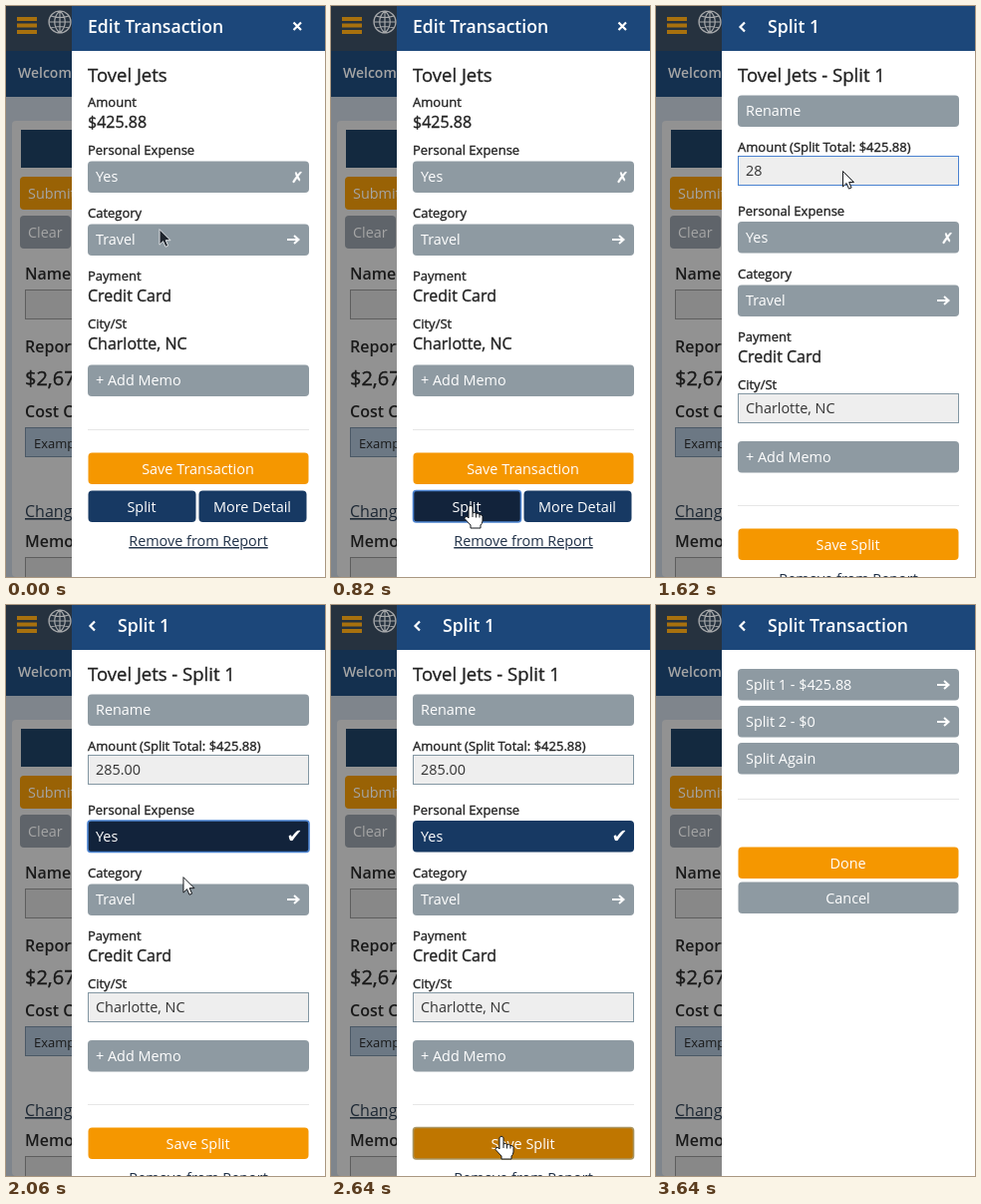
Recreate the animation shown at these times as an HTML page. Size 320 px wide and 572 px high, loop 8640 ms.

```html
<!DOCTYPE html>
<html lang="en">
<head>
<meta charset="utf-8">
<title>Split a transaction</title>
<style>
html, body { margin: 0; width: 100%; height: 100%; overflow: hidden; background: #fff; }
svg { display: block; width: 100vw; height: 100vh; }
text { font-family: "Open Sans", sans-serif; white-space: pre; }
.sym { font-family: "DejaVu Sans", sans-serif; }
.medium { stroke: currentColor; stroke-width: .35px; }
</style>
</head>
<body>
<svg viewBox="0 0 320 572">
  <g id="back"></g>
  <g id="panel"></g>
  <g id="cursor"></g>
</svg>
<script>
const LOOP = 8640;
const GREY = '#8e9aa2', GREY_ON = '#6c7781', NAVY = '#173963', NAVY_ON = '#12233b',
      ORANGE = '#f59700', ORANGE_ON = '#bf7600', INK = '#222', RING = '#4a82d0';
const VENDOR = 'Tovel Jets';
const $ = id => document.getElementById(id);

const text = (x, y, s, size = 14.4, fill = INK, more = '') =>
  `<text x="${x}" y="${y}" font-size="${size}" fill="${fill}" color="${fill}" ${more}>${s}</text>`;
const rect = (x, y, w, h, fill, more = '') =>
  `<rect x="${x}" y="${y}" width="${w}" height="${h}" fill="${fill}" ${more}/>`;
const line = (d, color, width) =>
  `<path d="${d}" fill="none" stroke="${color}" stroke-width="${width}"/>`;

const medium = 'class="medium"', semi = 'font-weight="600"', mid = 'text-anchor="middle"';
const label = (y, s) => text(82, y, s, 13, INK, medium);
const value = (y, s) => text(82, y, s, 16, INK, medium);
const heading = s => text(82, 76, s, 18.5, INK, medium);
const rule = y => rect(82, y, 222, 1, '#e6e6e6');
const arrow = y => line(`M282 ${y}h11.5m-4.5 -4l4.5 4l-4.5 4`, '#fff', 2);

function box(x, y, w, h, fill, focus) {
  return rect(x, y, w, h, fill, 'rx="4"') +
    (focus ? rect(x, y, w, h, 'none', `rx="3" stroke="${focus}" stroke-width="1.6"`) : '');
}
const row = (y, s, fill = GREY, focus) =>
  box(82, y, 222, 31.5, fill, focus) + text(90, y + 20.5, s, 14.4, '#fff');
const action = (y, s, fill = ORANGE, focus, x = 82, w = 222) =>
  box(x + .5, y + .5, w - 1, 31.5, fill, focus) +
  text(x + w / 2 - .5, y + 22, s, 14.4, '#fff', mid);
const field = (y, s, focus) =>
  rect(82.5, y + .5, 221, 29, '#eee', `stroke="${focus ? RING : '#8397a3'}"`) +
  text(90, y + 20, s, 14.4, '#333');

function toggle(y, on, focus) {
  const fill = on ? (focus ? NAVY_ON : NAVY) : (focus ? GREY_ON : GREY);
  const mark = on ? text(281.5, y + 22, '✔', 19, '#fff', 'class="sym"')
                  : text(286, y + 21.5, '✗', 15, '#fff', 'class="sym medium"');
  return row(y, 'Yes', fill, focus && RING) + mark;
}

function header(s, closable) {
  return rect(66, 0, 254, 572, '#fff') + rect(66, 0, 254, 45, '#1c477a') +
    text(closable ? 82 : 112, 27, s, 17.6, '#fff', semi) +
    line(closable ? 'M288.5 16.5l7.5 7.5m0 -7.5l-7.5 7.5' : 'M89 16.5l-4.5 4.5l4.5 4.5', '#fff', 2.2);
}

function editPage(t) {
  return header('Edit Transaction', true) + heading(VENDOR) +
    label(101, 'Amount') + value(122, '$425.88') +
    label(149, 'Personal Expense') + toggle(155.5, t > 200 && t < 360, t > 200 && t < 780) +
    label(212, 'Category') + row(218.5, 'Travel') + arrow(234) +
    label(275, 'Payment') + value(296, 'Credit Card') +
    label(323, 'City/St') + value(344, 'Charlotte, NC') +
    row(359.5, '+ Add Memo') + rule(424) +
    action(447, 'Save Transaction') +
    action(485, 'Split', t > 780 ? NAVY_ON : NAVY, t > 780 && RING, 82, 109) +
    action(485, 'More Detail', NAVY, '', 193, 109) +
    text(193, 541, 'Remove from Report', 14.4, '#1f3047', mid + ' text-decoration="underline"');
}

function splitsPage(t) {
  const focus = t > 1160 && t < 1300;
  return header('Split Transaction') +
    row(64, 'Split 1 - $425.88', focus ? GREY_ON : GREY, focus && RING) + arrow(80) +
    row(101, 'Split 2 - $0') + arrow(117) +
    row(138, 'Split Again') + rule(194) +
    action(242, 'Done') + action(277, 'Cancel', GREY);
}

function splitPage(t) {
  const typed = t < 1500 ? '425.88' : '285.00'.slice(0, Math.floor((t - 1500) / 50));
  const saving = t > 2580;
  return header('Split 1') + heading(VENDOR + ' - Split 1') +
    row(89.5, 'Rename') +
    label(146, 'Amount (Split Total: $425.88)') + field(150, typed, t > 1460 && t < 1940) +
    label(210, 'Personal Expense') + toggle(216, t > 1940, t > 1940 && !saving) +
    label(273, 'Category') + row(279.5, 'Travel') + arrow(295) +
    label(336, 'Payment') + value(357, 'Credit Card') +
    label(384, 'City/St') + field(388, 'Charlotte, NC') +
    row(436, '+ Add Memo') + rule(500) +
    action(523, 'Save Split', saving ? ORANGE_ON : ORANGE, saving && '#a9945f') +
    text(193, 579, 'Remove from Report', 14.4, '#1f3047', mid);
}

function backdrop() {
  const dark = '#191919', pale = '#a5a5a5';
  const input = (y, fill, edge) => rect(19.5, y + .5, 80, 29, fill, `stroke="${edge}"`);
  return rect(0, 0, 320, 572, '#7f858c') +
    rect(0, 0, 320, 45, '#26323f') + rect(0, 45, 320, 46, '#14304f') +
    line('M11 13h20m-20 6.5h20m-20 6.5h20', '#a8710e', 4) +
    line('M43 16a11 11 0 1 0 22 0a11 11 0 1 0 -22 0h22M54 5v22M54 5c-7 6 -7 16 0 22c7 -6 7 -16 0 -22M45 10q9 3 18 0M45 22q9 -3 18 0', '#a6a8aa', 1.2) +
    text(12, 72, 'Welcome,', 14, pale, semi) +
    rect(6, 115, 314, 457, '#929292', 'rx="4"') + rect(15, 124, 290, 38, '#13293f') +
    box(14, 171, 90, 33, '#996205') + text(22, 193, 'Submit', 14.4, pale) +
    box(14, 210, 51, 33, '#5f646a') + text(22, 232, 'Clear', 14.4, pale) +
    text(19, 274, 'Name', 16, dark, semi) + input(284, '#888', '#5e5e5e') +
    text(19, 347, 'Report', 16, dark, semi) + text(19, 380, '$2,67', 20, dark, medium) +
    text(19, 412, 'Cost Center', 16, dark, semi) + input(422, '#6c7884', '#4b5966') +
    text(28, 443, 'Example', 13, dark) +
    text(19, 512, 'Change', 16, '#1c2733', 'text-decoration="underline"') +
    text(19, 542, 'Memo', 16, dark, semi) + input(552, '#888', '#5e5e5e');
}

// Pointer stops: time, x, y of the tip
const stops = [
  [0, 154, 224], [160, 156, 172], [360, 156, 172], [480, 195, 309], [730, 140, 500],
  [860, 140, 500], [1140, 215, 71], [1300, 215, 71], [1440, 190, 165], [1800, 185, 166],
  [1910, 180, 232], [1970, 180, 232], [2060, 178, 272], [2460, 171, 532], [2720, 171, 532],
  [3160, 119, 193], [3560, -14, 130]
];
const hovers = [[140, 370], [710, 870], [1120, 1300], [1880, 2000], [2440, 2720]];
const ARROW = 'M0 0V15.5L3.6 12L6 17.6L8.6 16.5L6.2 11H11Z';
const HAND = 'M-2 1.5Q0 -1.5 2 1.5V8Q4 6.5 5.5 8.5Q7.5 7.5 9 9.5Q11.5 9 12 11.5V16Q11.5 19 10 20V23H0V20L-6 13.5Q-6 10.5 -3.5 11.5L-2 13Z';

function pointer(t) {
  const i = stops.findIndex(s => s[0] > t);
  if (i < 0) return '';
  const [t0, x0, y0] = stops[i - 1], [t1, x1, y1] = stops[i], k = (t - t0) / (t1 - t0);
  const x = x0 + (x1 - x0) * k, y = y0 + (y1 - y0) * k;
  const hand = hovers.some(([a, b]) => t >= a && t < b);
  const dark = t < 140 || t > 2720;
  const [fill, edge] = dark ? ['#20262e', '#dfe2e5'] : ['#fff', '#15181c'];
  return `<path transform="translate(${x} ${y})" d="${hand ? HAND : ARROW}" fill="${fill}" stroke="${edge}" stroke-linejoin="round"/>` +
    (hand ? line(`M${x + 2} ${y + 8}v4m3.5 -3.5v4m3.5 -3v3`, edge, 1) : '');
}

function draw(t) {
  const page = t < 860 ? editPage : t >= 1300 && t < 2720 ? splitPage : splitsPage;
  $('panel').innerHTML = page(t);
  $('cursor').innerHTML = pointer(t);
}

$('back').innerHTML = backdrop();
const start = performance.now();
function tick() {
  draw((performance.now() - start) % LOOP);
  requestAnimationFrame(tick);
}
tick();
</script>
</body>
</html>
```
